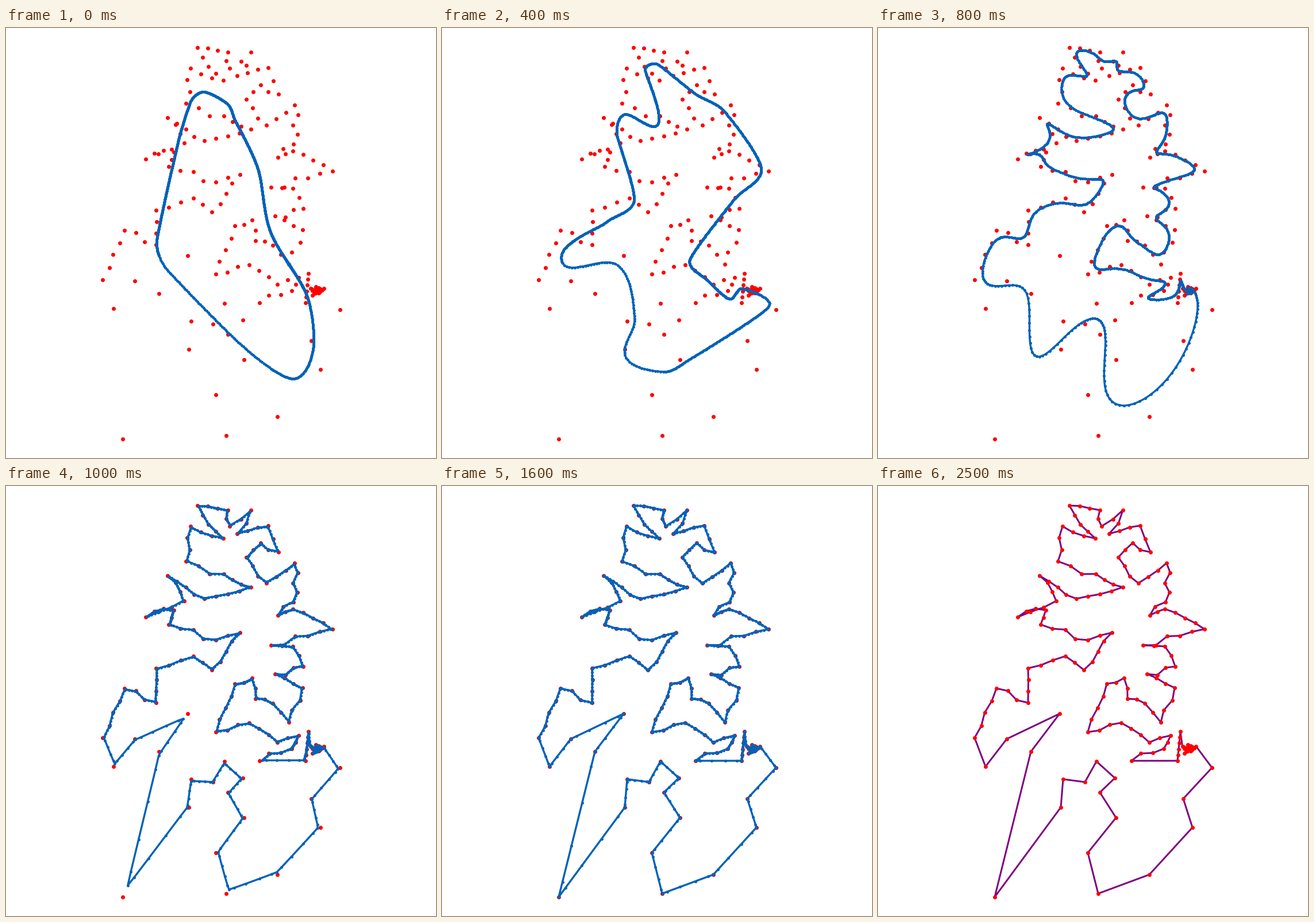
Animation, 748 px wide and 748 px high, one loop 2600 ms. Source, as a matplotlib script:

```python
import math

import matplotlib.pyplot as plt
import numpy as np
from matplotlib.animation import FuncAnimation

SIZE, DPI = 748, 100
PX = 72 / DPI
FRAMES, INTERVAL = 26, 100
NODES_PER_EDGE = 5
RED, BLUE, PURPLE = "#ff0000", "#0062b8", "#800080"

# Main corners of the finished tour, clockwise from the top.
CORNERS = [
    (333, 34), (386, 42), (389, 70), (426, 42), (402, 83), (456, 69),
    (474, 115), (443, 99), (418, 124), (453, 169), (502, 134), (507, 185),
    (473, 225), (499, 214), (568, 249), (461, 277), (499, 279), (517, 314),
    (468, 327), (516, 351), (492, 411), (464, 378), (434, 370), (428, 334),
    (398, 344), (365, 428), (423, 412), (472, 446), (509, 434), (497, 457),
    (441, 478), (581, 490), (531, 544), (547, 594), (472, 676), (383, 709),
    (365, 638), (414, 577), (386, 533), (412, 508), (380, 479), (360, 515),
    (322, 510), (318, 559), (203, 715), (266, 462), (316, 396), (224, 440),
    (187, 488), (168, 438), (206, 352), (261, 377), (261, 317), (326, 296),
    (358, 320), (407, 255), (365, 268), (283, 241), (292, 216), (243, 228),
    (310, 200), (281, 156), (345, 196), (426, 176), (379, 153), (313, 131),
    (321, 70), (378, 91), (352, 67),
]

# The elastic ring at the start and after its first tightening.
WIDE = [
    (345, 111), (385, 132), (398, 160), (438, 245), (460, 355), (523, 465),
    (534, 560), (498, 610), (410, 552), (280, 420), (262, 370), (300, 195),
    (322, 126),
]
TIGHTER = [
    (353, 72), (375, 63), (440, 114), (490, 144), (555, 244), (508, 298),
    (431, 403), (463, 440), (500, 471), (522, 453), (568, 485), (428, 578),
    (385, 598), (320, 573), (335, 505), (306, 413), (208, 405), (285, 338),
    (334, 300), (304, 185), (318, 150), (376, 166),
]

# Landmarks that keep the rings in step with each other.
LANDMARKS = [(350, 40), (440, 400), (550, 470), (383, 709), (175, 430)]


def harbour(rng):
    """A short spur followed by a dense knot of cities."""
    path = list(np.linspace((521, 478), (526, 427), 6))
    knot = list(rng.normal((540, 457), (5.5, 4), (28, 2)))
    while knot:
        gaps = [math.dist(path[-1], p) for p in knot]
        path.append(knot.pop(int(np.argmin(gaps))))
    return path


def between(a, b, rng):
    """Cities scattered along one edge of the tour."""
    x, y = (a + b) / 2
    if y > (480 if x > 360 else 405):
        return []
    step = b - a
    length = math.hypot(*step)
    normal = np.array((-step[1], step[0])) / length
    count = int(length / 25)
    return [a + step * (k + 1) / (count + 1) + normal * rng.normal(0, 3)
            for k in range(count)]


def build_cities():
    rng = np.random.default_rng(4)
    corners = np.array(CORNERS, float)
    east = corners[:, 0].max()
    cities = []
    for a, b in zip(corners, np.roll(corners, -1, axis=0)):
        cities.append(a)
        cities += harbour(rng) if b[0] == east else between(a, b, rng)
    return np.array(cities)


def smooth_ring(points, steps=20):
    """Closed Hermite curve whose tangents never outrun a short edge."""
    p = np.array(points, float)
    after, before = np.roll(p, -1, axis=0), np.roll(p, 1, axis=0)
    reach = np.minimum(np.hypot(*(after - p).T), np.hypot(*(p - before).T))
    chord = after - before
    tangent = chord * (reach / np.hypot(*chord.T))[:, None]
    t = np.linspace(0, 1, steps, endpoint=False)[:, None]
    ease = t * t * (3 - 2 * t)
    leave, arrive = t * (1 - t) ** 2, t * t * (t - 1)
    return np.vstack([
        a + (b - a) * ease + m * leave + n * arrive
        for a, b, m, n in zip(p, after, tangent, np.roll(tangent, -1, axis=0))
    ])


def tour_ring(cities):
    """Nodes along the tour, gathered near the cities."""
    u = np.arange(NODES_PER_EDGE) / NODES_PER_EDGE
    u = (u * u * (3 - 2 * u))[None, :, None]
    a = cities[:, None]
    b = np.roll(cities, -1, axis=0)[:, None]
    return (a + (b - a) * u).reshape(-1, 2)


def relax(ring, sigma):
    """Gaussian average of each node with its neighbours on the ring."""
    reach = int(3 * sigma)
    shifts = range(-reach, reach + 1)
    weights = [math.exp(-(s / sigma) ** 2 / 2) for s in shifts]
    total = sum(w * np.roll(ring, s, axis=0) for s, w in zip(shifts, weights))
    return total / sum(weights)


def legs(ring):
    """Rotate a ring to the first landmark and cut it at all of them."""
    def nearest(curve, mark):
        return int(np.argmin(np.hypot(*(curve - mark).T)))

    ring = np.roll(ring, -nearest(ring, LANDMARKS[0]), axis=0)
    cuts = [0] + [nearest(ring, m) for m in LANDMARKS[1:]] + [len(ring)]
    closed = np.vstack([ring, ring[:1]])
    return [closed[i:j + 1] for i, j in zip(cuts, cuts[1:])]


def resample(leg, count):
    dist = np.r_[0, np.cumsum(np.hypot(*np.diff(leg, axis=0).T))]
    at = np.linspace(0, dist[-1], count, endpoint=False)
    return np.column_stack([np.interp(at, dist, axis) for axis in leg.T])


cities = build_cities()
tour_legs = legs(tour_ring(cities))
tour = np.vstack([leg[:-1] for leg in tour_legs])
close = relax(tour, 1.2 * NODES_PER_EDGE)
wide, tighter = (
    np.vstack([resample(leg, len(goal) - 1)
               for leg, goal in zip(legs(smooth_ring(points)), tour_legs)])
    for points in (WIDE, TIGHTER))


def ring_at(frame):
    if frame < 4:
        return wide + (tighter - wide) * frame / 4
    if frame < 8:
        return tighter + (close - tighter) * (frame - 4) / 4
    return tour + (close - tour) * math.exp(8 - frame)


fig = plt.figure(figsize=(SIZE / DPI, SIZE / DPI), dpi=DPI, facecolor="white")
ax = fig.add_axes((0, 0, 1, 1))
ax.set(xlim=(0, SIZE), ylim=(SIZE, 0))
ax.axis("off")

ax.plot(*cities.T, "o", color=RED, ms=7 * PX, mew=0, zorder=2)
ring_line, = ax.plot([], [], "-o", color=BLUE, lw=3.4 * PX, ms=5 * PX,
                     mew=0, solid_joinstyle="round", zorder=3)
route = np.vstack([cities, cities[:1]])
route_line, = ax.plot(*route.T, color=PURPLE, lw=3 * PX,
                      solid_joinstyle="round", zorder=1)


def draw(frame):
    finished = frame == FRAMES - 1
    route_line.set_visible(finished)
    ring_line.set_visible(not finished)
    ring = ring_at(frame)
    ring_line.set_data(*np.vstack([ring, ring[:1]]).T)
    return ring_line, route_line


animation = FuncAnimation(fig, draw, frames=FRAMES, interval=INTERVAL,
                          init_func=lambda: draw(0), repeat=True,
                          repeat_delay=0)
plt.show()
```
